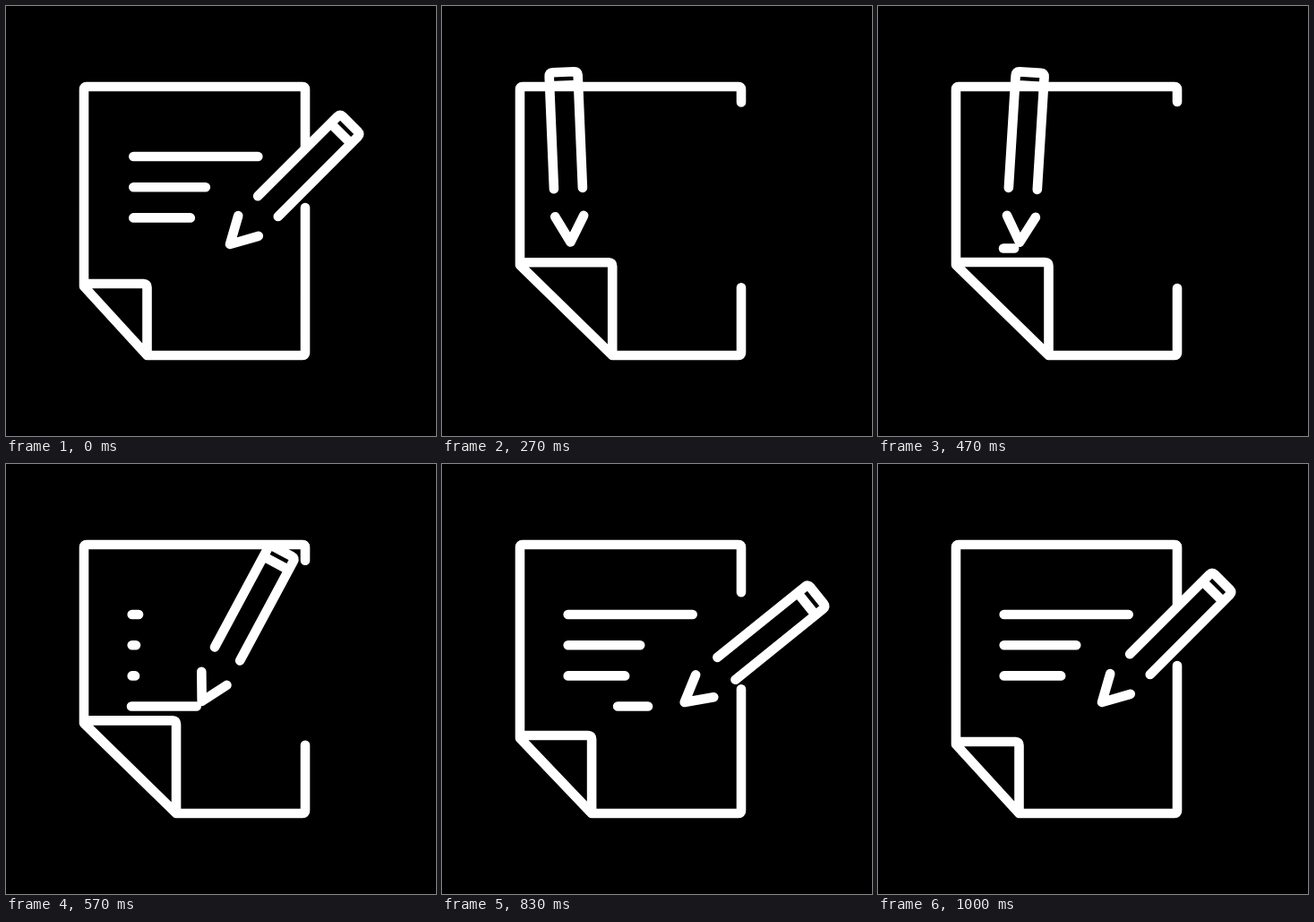
An HTML page for the animation above (1200 ms loop, 480 by 480 pixels).

```html
<!DOCTYPE html>
<html lang="en">
<head>
<meta charset="utf-8">
<title>Writing a note</title>
<style>
  html, body { margin: 0; width: 100%; height: 100%; overflow: hidden; background: #000; }
  svg { display: block; width: 100vw; height: 100vh; }
  path { fill: none; stroke: #fff; stroke-width: 10.6; stroke-linecap: round; stroke-linejoin: round; }
</style>
</head>
<body>
<svg viewBox="0 0 480 480">
  <path id="page"/>
  <path id="text"/>
  <g id="pencil">
    <path d="M-16-60V-186Q-16-190-12-190H12Q16-190 16-186V-60M-16-175H16"/>
    <path d="M-16-29L0 0L16-29"/>
  </g>
</svg>
<script>
const LOOP = 1200, STEP = 100 / 3;
const page = document.getElementById('page');
const text = document.getElementById('text');
const pencil = document.getElementById('pencil');

const mix = (a, b, k) => a + (b - a) * k;

// Easing curve with control points (x1, 0) and (x2, 1)
function bezier(x1, x2) {
  return u => {
    let lo = 0, hi = 1, s = 0.5;
    for (let i = 0; i < 24; i++) {
      s = (lo + hi) / 2;
      const x = 3 * (1 - s) ** 2 * s * x1 + 3 * (1 - s) * s * s * x2 + s ** 3;
      if (x < u) lo = s; else hi = s;
    }
    return s * s * (3 - 2 * s);
  };
}
const smooth = u => u * u * (3 - 2 * u);
const settle = bezier(0.33, 0.28);
const launch = bezier(0.92, 0.5);

function phase(t, from, to, ease) {
  const u = (t - from) / (to - from);
  return u <= 0 ? 0 : u >= 1 ? 1 : ease(u);
}

function drawPage(open) {
  const fx = mix(157.5, 190.5, open), fy = mix(310, 286, open);
  const top = mix(158, 107, open), bottom = mix(225, 315, open);
  page.setAttribute('d',
    `M334 ${bottom}V387Q334 390 331 390H${fx}L87 ${fy + 3}V93Q87 90 90 90H331Q334 90 334 93V${top}` +
    `M87 ${fy}H${fx - 4}Q${fx} ${fy} ${fx} ${fy + 4}V390`);
}

function drawText(t, tipX) {
  const erase = phase(t, 0, 280, settle), write = phase(t, 1600 / 3, 2440 / 3, settle);
  const shown = 1 - erase + write;
  const left = t < 400 ? 142.3 : 140.7;
  const lines = [139, 80.5, 63.5].map((w, i) => [left, left + w * shown, 168 + i * 34.2]);

  // The fourth line follows the tip, then shrinks towards its right end
  const shrink = phase(t, 600, 1000, smooth);
  const end = t < 300 ? 0 : t < 600 ? Math.min(230, tipX - 6) : 230;
  lines.push([mix(140, 230, shrink), end, 270.5]);

  text.setAttribute('d', lines
    .filter(([a, b]) => b - a > 1)
    .map(([a, b, y]) => `M${a} ${y}H${b}`).join(''));
}

function draw(t) {
  const sweep = phase(t, 0, 300, settle);
  const close = phase(t, 1600 / 3, 1000, smooth);
  const out = phase(t, 300, 700, launch);
  const back = phase(t, 700, 1000, smooth);
  const pose = (rest, left, right) =>
    mix(mix(mix(rest, left, sweep), right, out), rest, back);

  const x = pose(250, 142.5, 285.5);
  const y = pose(266, 263.5, 266);
  const angle = pose(45, -2.8, 55.5);
  pencil.setAttribute('transform', `translate(${x} ${y}) rotate(${angle})`);
  drawPage(sweep - close);
  drawText(t, x);
}

const start = performance.now();
function tick() {
  const t = (performance.now() - start) % LOOP;
  draw(Math.floor((t + 3.4) / STEP) % 36 * STEP);
  requestAnimationFrame(tick);
}
tick();
</script>
</body>
</html>
```
